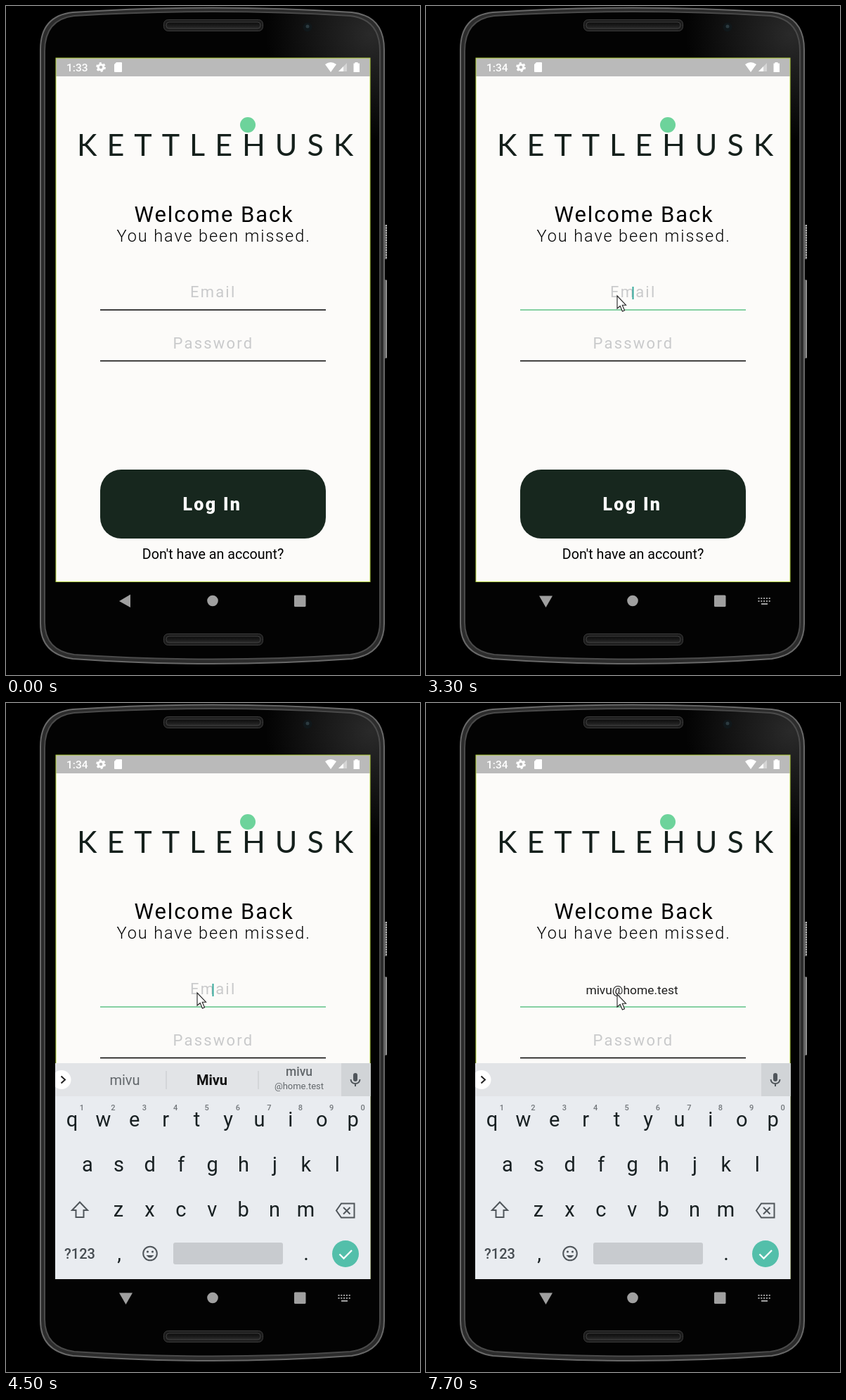
Recreate the animation shown at these times as an HTML page. Size 589x951 px, loop 8000 ms.

```html
<!DOCTYPE html>
<html lang="en">
<head>
<meta charset="utf-8">
<title>Login screen</title>
<style>
  html, body { margin: 0; width: 100%; height: 100%; overflow: hidden; background: #000; }
  svg { display: block; width: 100vw; height: 100vh; font-family: Roboto, sans-serif; }
  text { white-space: pre; }
  .mid { text-anchor: middle; }
  .hint { font-size: 22px; letter-spacing: 2.2px; fill: #c9cacb; }
  .icon { fill: none; stroke: #50565b; stroke-width: 2; }
  .key { font-size: 29px; fill: #182022; text-anchor: middle; }
  .digit { font-size: 11px; font-weight: 500; fill: #72777b; text-anchor: middle; }
  .word { font-size: 20px; fill: #62676b; text-anchor: middle; }
</style>
</head>
<body>
<svg viewBox="0 0 589 951" preserveAspectRatio="none">
  <defs>
    <linearGradient id="slot" x2="0" y2="1">
      <stop offset="0" stop-color="#0b0b0b"/><stop offset="1" stop-color="#2a2a2a"/>
    </linearGradient>
    <radialGradient id="gloss" gradientUnits="userSpaceOnUse" cx="520" cy="40" r="150">
      <stop offset="0" stop-color="#2a2a2a"/><stop offset="1" stop-color="#030303"/>
    </radialGradient>
    <clipPath id="screen"><rect x="70" y="74" width="448.500" height="745"/></clipPath>
    <g id="speaker">
      <rect x="224.500" y="0.500" width="141" height="16" rx="6" fill="#1c1c1c" stroke="#3c3c3c"/>
      <rect x="228" y="4" width="134" height="9" rx="4" fill="url(#slot)" stroke="#404040"/>
    </g>
  </defs>

  <rect width="589" height="951"/>

  <!-- phone body -->
  <rect x="537" y="311" width="5" height="49" fill="#555"/>
  <path d="M541 311V360" stroke="#bbb" stroke-width="2" stroke-dasharray="2 1.500"/>
  <rect x="537" y="389" width="5" height="112" rx="1" fill="#555"/>
  <path d="M541 390V500" stroke="#b5b5b5" stroke-width="1.300"/>
  <path d="M49 62Q49 14 95 9Q294-4 492 9Q538 14 538 62V878Q538 921 492 928Q294 942 95 928Q49 921 49 878Z"
        fill="#2c2c2c" stroke="#686868" stroke-width="2"/>
  <path d="M55 64Q55 19 97 14Q294 2 490 14Q532 19 532 64V876Q532 916 490 922Q294 935 97 922Q55 916 55 876Z"
        fill="url(#gloss)" stroke="#4a4a4a" stroke-width="2"/>
  <use href="#speaker" y="19"/>
  <use href="#speaker" y="892"/>
  <circle cx="429" cy="30" r="6.500" fill="#10171a"/>
  <circle cx="429" cy="29" r="2.500" fill="#2b3a40"/>

  <!-- app screen -->
  <rect x="71" y="74" width="447" height="745" fill="#fcfbf9"/>
  <rect x="71" y="74" width="447" height="26" fill="#bababa"/>
  <g fill="#fff">
    <text id="clock" x="86" y="92.500" font-size="15.500" font-weight="500"></text>
    <circle cx="135" cy="87" r="3.800" fill="none" stroke="#fff" stroke-width="3"/>
    <circle cx="135" cy="87" r="5.900" fill="none" stroke="#fff" stroke-width="2" stroke-dasharray="3.100 3.080"/>
    <path d="M157 80H164Q165 80 165 81V93Q165 94 164 94H155Q154 94 154 93V83Z"/>
    <path d="M454 83Q462 77 470 83L462 94Z"/>
    <path d="M485 81V93H473Z" opacity=".4"/><path d="M480 86V93H473Z"/>
    <path d="M496.500 80H500.500V81.500H503V94H494.500V81.500H496.500Z"/>
  </g>
  <rect x="71" y="74" width="447" height="744.500" fill="none" stroke="#b4d23c"/>

  <circle cx="344" cy="169" r="11" fill="#6dd39b"/>
  <text x="101" y="213" font-family="Lato, sans-serif" font-size="43" letter-spacing="14" fill="#141f1b">KETTLEHUSK</text>

  <text x="182.500" y="307" font-size="31" letter-spacing="1.900">Welcome Back</text>
  <text x="157.500" y="335" font-size="23.500" font-weight="300" letter-spacing="1.900">You have been missed.</text>

  <text id="emailHint" class="hint" x="262" y="414">Email</text>
  <text id="email" class="mid" x="293" y="413.500" font-size="17.400" fill="#202020"></text>
  <rect id="caret" width="2" height="18" y="399" fill="#35a99c"/>
  <path id="emailLine" d="M134 432H455" stroke-width="1.400"/>
  <text class="hint" x="237.500" y="487">Password</text>
  <path d="M134 504.500H455" stroke="#000" stroke-width="1.400"/>

  <rect x="134" y="659" width="321" height="98" rx="30" fill="#17271e"/>
  <text x="251.500" y="717" font-size="25" font-weight="800" letter-spacing="2.300" fill="#fff">Log In</text>
  <text class="mid" x="294.500" y="786" font-size="19.700">Don't have an account?</text>

  <g clip-path="url(#screen)">
    <g id="keyboard">
      <rect x="70" y="512" width="449" height="307" fill="#e9ecf0"/>
      <rect x="70" y="512" width="449" height="47" fill="#e2e4e7"/>
      <rect x="477" y="512" width="42" height="47" fill="#d1d4d7"/>
      <circle cx="79" cy="535.500" r="13.500" fill="#fff"/>
      <path d="M78.500 530.500L84 535.500L78.500 540.500" class="icon" style="stroke:#222"/>
      <rect x="494" y="526" width="6" height="12" rx="3" fill="#50565b"/>
      <path d="M490.500 535Q491 541 497 541T503.500 535M497 541V545" class="icon"/>
      <g id="words"></g>
      <g id="keys"></g>
      <path d="M105 709.500L116 721H110.500V731H99.500V721H94Z" class="icon"/>
      <path d="M477 711.500H495.500V731.500H477L470 721.500ZM480 717L489.500 726.500M489.500 717L480 726.500" class="icon"/>
      <text class="mid" x="105" y="790" font-size="20" font-weight="500" fill="#454b50">?123</text>
      <circle cx="205" cy="782.500" r="9.800" class="icon"/>
      <path d="M199.500 785Q205 792 210.500 785Z" fill="#50565b"/>
      <circle cx="201.500" cy="780" r="1.600" fill="#50565b"/><circle cx="208.500" cy="780" r="1.600" fill="#50565b"/>
      <rect x="238" y="767" width="156" height="31" rx="3" fill="#c8cbcf"/>
      <circle cx="483" cy="783" r="19" fill="#53bfaa"/>
      <path d="M474.500 783.500L480.500 789.500L492 778" fill="none" stroke="#fff" stroke-width="2.300"/>
    </g>
  </g>

  <!-- navigation bar -->
  <g fill="#a0a0a0">
    <path id="back"/>
    <circle cx="294" cy="845.500" r="7.800"/>
    <rect x="410" y="837.500" width="16.500" height="16.500" rx="1.500"/>
    <g id="imeIcon" stroke="#a0a0a0" stroke-width="2">
      <path d="M472.500 842H490M472.500 846H490" stroke-dasharray="2 1.800"/>
      <path d="M477 850H486"/>
    </g>
  </g>

  <path id="pointer" d="M0 0V18L4.200 14.500L7.400 22L10.500 20.700L7.300 13.200H12.500Z" fill="#fff" stroke="#222" stroke-width="1.100"/>
</svg>
<script>
const LOOP = 8000, TICK = 100;
const FOCUS = 3100, NAV = 3200, SLIDE = [3300, 3500], SLIDE_HEIGHT = 307;
const ADDRESS = "mivu@home.test";

const keyTimes = [4600, 4700, 4800, 4900, 5400, 5900, 6100, 6300, 6500, 6700, 6800, 6900, 7100, 7300];
const caretOff = [[3600, 4100], [5100, 5400], [5800, 5900], [7700, 8000]];
const pointerPath = [
  [1800, 510, 471], [1900, 340, 424], [2000, 275, 408], [2300, 264, 409], [2600, 272, 412],
  [5700, 272, 412], [5800, 273, 414], [6200, 273, 414], [6300, 272, 414]
];

const el = id => document.getElementById(id);
const show = (id, on) => el(id).setAttribute("visibility", on ? "visible" : "hidden");
const label = (text, x, y, cls, extra = "") => `<text class="${cls}" x="${x}" y="${y}" ${extra}>${text}</text>`;

function buildKeys() {
  const rows = [["qwertyuiop", 94, 601.5], ["asdfghjkl", 116, 665.5], ["zxcvbnm", 160, 729.5]];
  let out = label(",", 161, 792, "key") + label(".", 427, 792, "key");
  rows.forEach(([letters, left, y], row) => [...letters].forEach((letter, i) => {
    const x = left + i * 44.4;
    out += label(letter, x, y, "key");
    if (row === 0) out += label((i + 1) % 10, x + 14, 579, "digit");
  }));
  el("keys").innerHTML = out;
}

const dividers = '<path d="M228 523V549M359 523V549" stroke="#c4c7ca"/>';
const wordSets = {
  common: dividers + label("thanks", 169, 543, "word") + label("I", 293, 543, "word") + label("we", 417, 543, "word"),
  names: dividers + label("mivu", 169, 543, "word")
    + label("Mivu", 293, 543, "word", 'style="font-weight:700;fill:#111"')
    + label("mivu", 417, 530, "word", 'style="font-size:17.500px;font-weight:500"')
    + label("@home.test", 417, 549, "word", 'style="font-size:13px"'),
  none: ""
};
let shownWords;
function setWords(name) {
  if (name === shownWords) return;
  shownWords = name;
  el("words").innerHTML = wordSets[name];
}

function pointerAt(t) {
  const next = pointerPath.findIndex(p => p[0] > t);
  if (next < 0) return pointerPath.at(-1).slice(1);
  const [t0, x0, y0] = pointerPath[next - 1], [t1, x1, y1] = pointerPath[next];
  const k = (t - t0) / (t1 - t0);
  return [x0 + (x1 - x0) * k, y0 + (y1 - y0) * k];
}

function draw(t) {
  const focused = t >= FOCUS, nav = t >= NAV;
  el("clock").textContent = t < 1000 ? "1:33" : "1:34";

  const typed = ADDRESS.slice(0, keyTimes.filter(k => k <= t).length);
  const email = el("email");
  email.textContent = typed;
  show("emailHint", !typed);
  show("caret", focused && !caretOff.some(([a, b]) => t >= a && t < b));
  el("caret").setAttribute("x", typed ? 293 + email.getComputedTextLength() / 2 : 293.5);
  el("emailLine").setAttribute("stroke", focused ? "#5fc287" : "#000");

  el("back").setAttribute("d", nav ? "M161 838.500H180L170.500 855Z" : "M161 846L177 836.500V855Z");
  show("imeIcon", nav);

  const k = Math.min(1, Math.max(0, (t - SLIDE[0]) / (SLIDE[1] - SLIDE[0])));
  el("keyboard").setAttribute("transform", `translate(0 ${SLIDE_HEIGHT * (1 - k) ** 2})`);
  show("keyboard", k > 0);
  setWords(t < 4300 ? "common" : t < 5500 ? "names" : "none");

  const visible = t >= pointerPath[0][0];
  show("pointer", visible);
  if (visible) el("pointer").setAttribute("transform", `translate(${pointerAt(t)})`);
}

buildKeys();
const start = performance.now();
function frame() {
  const t = (performance.now() - start) % LOOP;
  draw(Math.floor(t / TICK) * TICK);
  requestAnimationFrame(frame);
}
frame();
</script>
</body>
</html>
```
